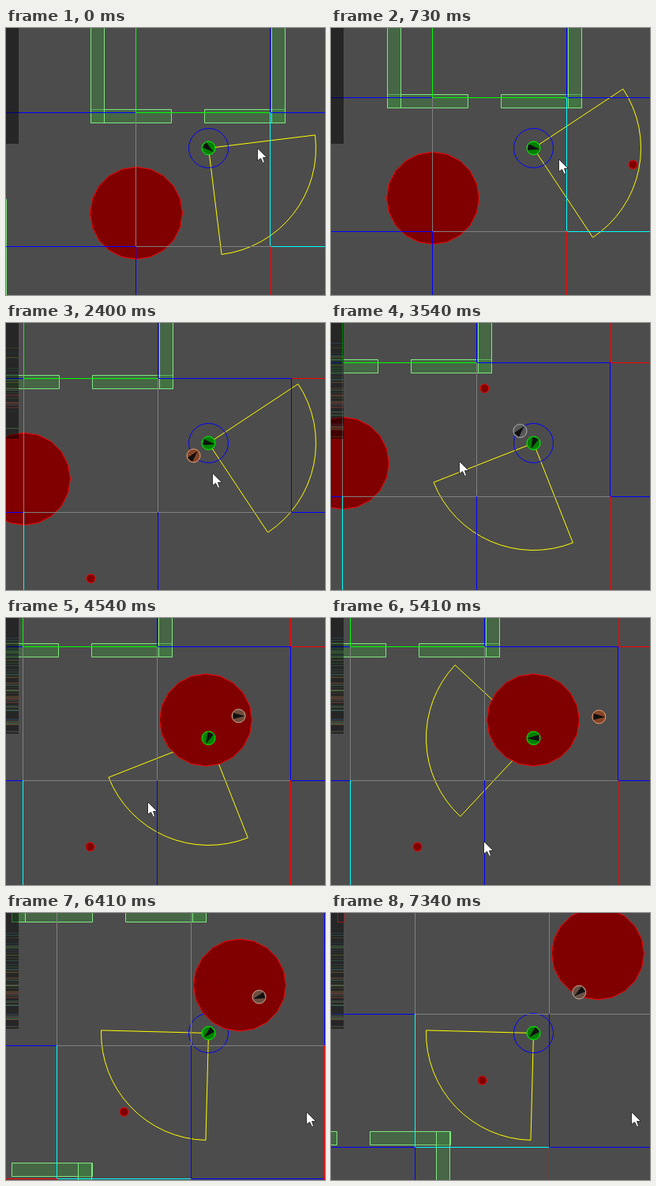
An HTML page with a canvas that plays this animation: 404x339 px, repeating every 7.41 s.

```html
<!DOCTYPE html>
<html lang="en">
<head>
<meta charset="utf-8">
<title>Vision cone on a grid</title>
<style>
html, body { margin: 0; width: 100%; height: 100%; overflow: hidden; background: #4c4c4c; }
canvas { display: block; }
</style>
</head>
<body>
<canvas id="stage" width="404" height="339"></canvas>
<script>
const ctx = document.getElementById('stage').getContext('2d');
const LOOP = 7410, TICK = LOOP / 111;
const RAD = Math.PI / 180;
const CELL = 169.5, TURN_MS = 130;
const PLAYER = [256, 152];
const START = [164, 107];

// The player stays put and the world slides under it.
const LEGS = [
  { from: 0, to: 400, dx: -14.5, dy: -15.7, heading: 38 },
  { from: 400, to: 2670, dx: -144.8, dy: -24.1, heading: 11.5 },
  { from: 3230, to: 3780, dx: 16.5, dy: -31.4, heading: 113.5 },
  { from: 5200, to: 5410, dx: 2.8, dy: 0.2, heading: 178 },
  { from: 5525, to: LOOP, dx: 85.2, dy: -81, heading: 136.5 }];

// [time, x, y]; the enemy adds its colour saturation
const MOUSE = [[0, 318, 152], [1460, 258, 180], [2400, 261, 190], [3540, 162, 175],
  [5410, 193, 283], [6410, 380, 252], [LOOP, 380, 252]];
const ENEMY = [[1700, 254, 85, 55], [2400, 215, 98, 55], [3540, 225, 86.5, 0],
  [5410, 315, 89, 55], [6410, 256, 108, 25], [7340, 208, 142, 20], [LOOP, 204, 145, 20]];

// Corners of the horizontal and vertical wall pieces
const PLANKS = [[-57, -4], [87, -4], [-57, 319], [-201, 319]];
const POSTS = [[-57, -200], [172, -200], [27, 319], [-181, 110]];

const clamp = v => Math.min(1, Math.max(0, v));

function tween(keys, t) {
  const i = Math.max(1, keys.findIndex(k => k[0] > t));
  const a = keys[i - 1], b = keys[i], f = clamp((t - a[0]) / (b[0] - a[0]));
  const value = a.slice(1).map((v, n) => v + (b[n + 1] - v) * f);
  return { value, heading: Math.atan2(b[2] - a[2], b[1] - a[1]) / RAD };
}

function walk(t) {
  let [x, y] = START, facing = LEGS[0].heading;
  for (const { from, to, dx, dy, heading } of LEGS) {
    const f = clamp((t - from) / (to - from));
    x += dx * f;
    y += dy * f;
    facing += (heading - facing) * clamp((t - from) / TURN_MS);
  }
  return { x: Math.round(x), y: Math.round(y), facing };
}

function paint(fill, stroke) {
  if (fill) { ctx.fillStyle = fill; ctx.fill(); }
  if (stroke) { ctx.strokeStyle = stroke; ctx.stroke(); }
}

function polygon(points, fill, stroke) {
  ctx.beginPath();
  points.forEach(p => ctx.lineTo(...p));
  ctx.closePath();
  paint(fill, stroke);
}

function circle(x, y, r, fill, stroke) {
  ctx.beginPath();
  ctx.arc(x, y, r, 0, 7);
  paint(fill, stroke);
}

function box(x, y, w, h, fill, stroke) {
  ctx.beginPath();
  ctx.rect(x, y, w, h);
  paint(fill, stroke);
}

const polar = (x, y, r, deg) => [x + r * Math.cos(deg * RAD), y + r * Math.sin(deg * RAD)];

// Known cells are grey, the goal cyan, the start room green, their neighbours blue, the rest red.
// Each cell owns its left and bottom edge.
function drawGrid(ox, oy, t) {
  const known = t < 1800 ? ['0,0'] : ['0,0', '1,0'];
  const goal = t < 1800 ? '1,0' : '0,1';
  const room = '0,-1';
  const here = PLAYER.map((p, i) => Math.floor((p - [ox, oy][i]) / CELL)).join();
  const open = [...known, room, here];
  const colour = (i, j) => {
    const id = `${i},${j}`;
    if (id === goal) return '#00ffff';
    if (id === room) return '#00ff00';
    if (known.includes(id)) return '#808080';
    const near = [[1, 0], [-1, 0], [0, 1], [0, -1]].some(([a, b]) => open.includes(`${i + a},${j + b}`));
    return near ? '#0000ff' : '#ff0000';
  };
  for (let j = -1; j < 3; j++) {
    for (let i = 2; i > -3; i--) {
      const x = ox + Math.round(i * CELL), y = oy + Math.round(j * CELL);
      ctx.fillStyle = colour(i, j);
      ctx.fillRect(x, y, 1, 170);
      ctx.fillRect(x, oy + Math.round((j + 1) * CELL), 170, 1);
    }
  }
}

function drawDisc(x, y, moved) {
  polygon(Array.from({ length: 20 }, (_, i) => polar(x, y, 58.5, i * 18)), '#800000', '#ff0000');
  if (!moved) return;
  ctx.save();
  ctx.clip();
  ctx.setLineDash([1, 3]);
  ctx.beginPath();
  ctx.arc(235, 150, 70, -107 * RAD, 0);
  paint(null, '#5c1010');
  ctx.restore();
}

function drawAgent(x, y, heading, fill, stroke) {
  circle(x, y, 8.5, fill, stroke);
  polygon([0, 150, 210].map(turn => polar(x, y, 8, heading + turn)), '#101010');
}

function drawPanel(t) {
  ctx.fillStyle = 'rgba(0,0,0,.5)';
  ctx.fillRect(0, 0, 16, 147);
  let seed = 7;
  const rnd = () => (seed = seed * 16807 % 2147483647) / 2147483647;
  const count = Math.min(75, (t - 900) / 45);
  for (let i = 0; i < count; i++) {
    const early = i < 14;
    const y = Math.floor(early ? 82 + rnd() * 28 : 25 + rnd() * 120);
    ctx.fillStyle = `hsla(${early ? 0 : rnd() * 220},45%,38%,${0.1 + rnd() * 0.35})`;
    ctx.fillRect(0, y, 16, 1);
  }
  if (t > 6900) box(8.5, -1.5, 8, 13, null, '#a01818');
}

function drawCursor(x, y) {
  const shape = [[0, 0], [0, 16], [4, 13], [7, 19], [9, 18], [7, 12], [12, 12]];
  polygon(shape.map(([a, b]) => [x + a, y + b]), '#ffffff', '#303030');
}

// Draws with strokes centred on pixels.
function crisp(drawing) {
  ctx.save();
  ctx.translate(0.5, 0.5);
  drawing();
  ctx.restore();
}

function draw(t) {
  const { x: ox, y: oy, facing } = walk(t);
  const [px, py] = PLAYER;
  ctx.lineWidth = 1;
  ctx.fillStyle = '#4c4c4c';
  ctx.fillRect(0, 0, 404, 339);

  crisp(() => {
    const wall = (x, y, w, h) => box(ox + x, oy + y, w, h, 'rgba(64,128,64,.5)', '#80e680');
    PLANKS.forEach(p => wall(...p, 102, 17));
    POSTS.forEach(p => wall(...p, 17, 213));

    ctx.beginPath();
    ctx.moveTo(px, py);
    ctx.arc(px, py, 136, (facing - 45) * RAD, (facing + 45) * RAD);
    ctx.closePath();
    paint(null, '#ffff00');
    circle(px, py, 25, null, '#0000ff');

    const moved = t > 4500;
    const [dx, dy] = moved ? [231.5, 93] : [0.5, 127.5];
    drawDisc(ox + dx, oy + dy, moved && t < 6700);
  });

  drawGrid(ox, oy, t);

  crisp(() => {
    const strayed = t > 2900 && t < 4200;
    const [wx, wy] = strayed ? [180, 32.5] : t < 1800 ? [254, 85] : [85, 254];
    circle(ox + wx, oy + wy, 5.5, '#800000', '#ff0000');

    drawAgent(px, py, facing, '#008000', '#00ff00');
    if (t > ENEMY[0][0]) {
      const { value: [ex, ey, sat], heading } = tween(ENEMY, t);
      drawAgent(ox + ex, oy + ey, heading, `hsl(18,${sat}%,34%)`, `hsl(22,${sat * 1.5}%,70%)`);
    }
  });

  drawPanel(t);
  crisp(() => drawCursor(...tween(MOUSE, t).value.map(Math.round)));
}

const start = performance.now();
function frame() {
  const t = (performance.now() - start) % LOOP;
  draw(Math.floor((t + 10) / TICK) * TICK % LOOP);
  requestAnimationFrame(frame);
}
frame();
</script>
</body>
</html>
```
